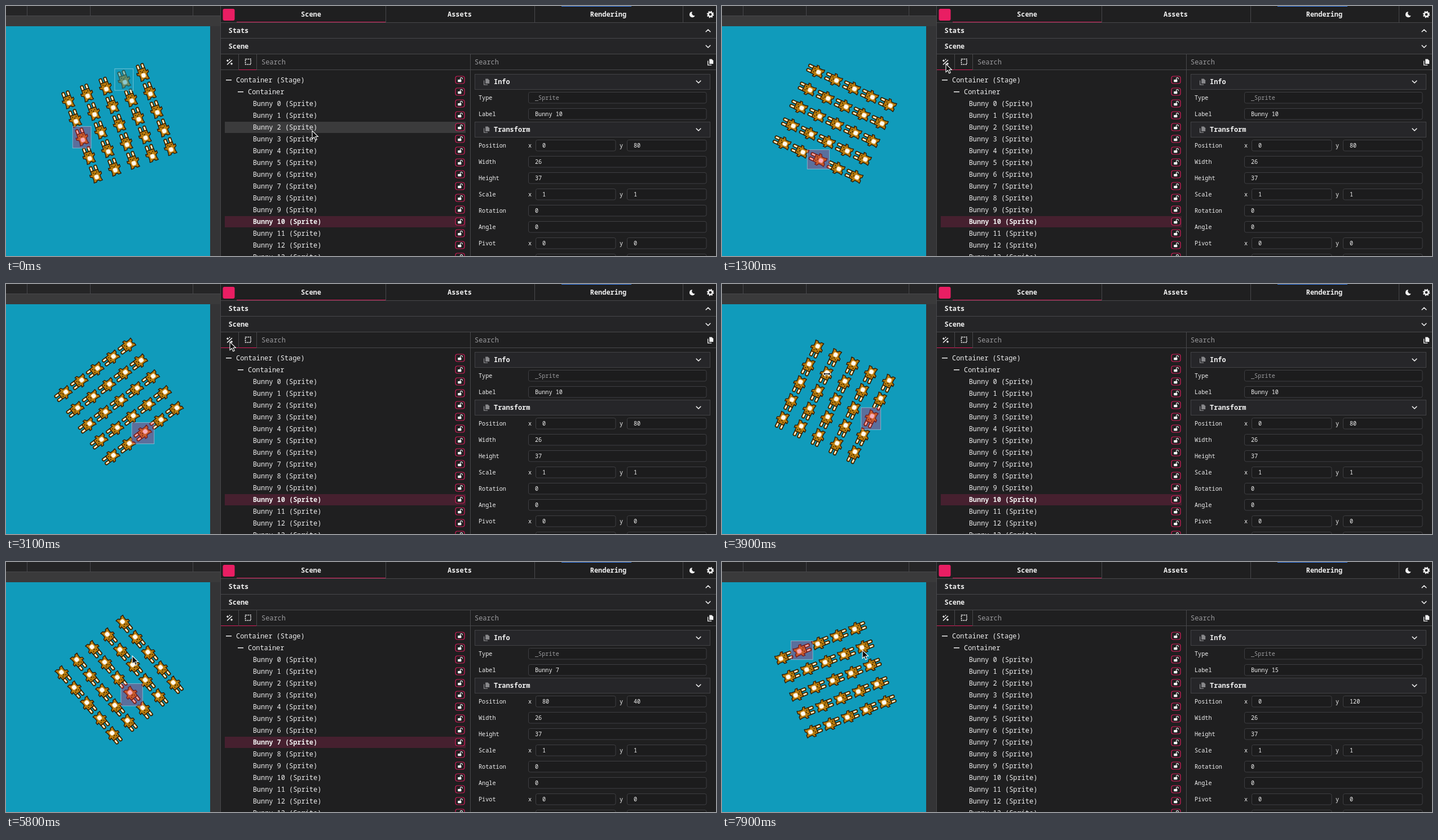
Write an HTML page that moves like this. It is 1259 px wide and 445 px high and loops after 8000 ms.

```html
<!DOCTYPE html>
<html lang="en">
<head>
<meta charset="utf-8">
<title>Scene inspector</title>
<style>
  html, body { margin: 0; width: 100%; height: 100%; overflow: hidden; background: #1f1f20; }
  svg { display: block; }
  text { font: 11.93px "Noto Sans Mono", "DejaVu Sans Mono", monospace; fill: #f1f1f1; white-space: pre; }
  .bold { font-weight: 700; }
  .semi { font-weight: 600; }
  .small { font-size: 10.2px; }
  .dim { fill: #9c9c9f; }
  .mid { text-anchor: middle; }
  .line { fill: none; stroke: #f1f1f1; stroke-width: 1.6; stroke-linecap: round; stroke-linejoin: round; }
  .edge { stroke: #48484b; fill: none; }
  .field { fill: #1c1c1d; stroke: #3f3f42; }
  .head { fill: #262629; stroke: #424245; }
</style>
</head>
<body>
<svg id="stage" width="1259" height="445" viewBox="0 0 1259 445">
  <defs>
    <g id="bunny" stroke="#2e1b04" stroke-width="1.6" stroke-linejoin="round">
      <path d="M-7.6-7V-17Q-5-19.6-2-17V-7Z M7.6-7V-17Q5-19.6 2-17V-7Z" fill="#b97c0e"/>
      <path d="M-4.8-9.5V-16M4.8-9.5V-16" stroke="#fff3dc" stroke-width="2.8"/>
      <path d="M-7.5-8H7.5L8.2-1 11.8-2.5 12 2 7.6 4.5 7.8 11 9 15.5H3.4L2 13H-2L-3.4 15.5H-9L-7.8 11-7.6 4.5-12 2-11.8-2.5-8.2-1Z" fill="#b97c0e"/>
      <path d="M-3.7-5V-2.8M3.7-5V-2.8M-1.5-1.2H1.5" fill="none"/>
      <rect x="-4.4" y="1.2" width="8.8" height="9" rx="3" fill="#fffaf0" stroke="#e2b566" stroke-width="1"/>
    </g>
    <g id="lock">
      <rect x="-8" y="-6.5" width="16" height="13" rx="3.5" fill="#1f1f20" stroke="#d81e5b" stroke-width="1.2"/>
      <rect x="-3.8" y="-.6" width="6.2" height="4.4" rx=".8" fill="#fff"/>
      <path d="M.6-.6V-2.2Q.6-4 2.4-4T4.2-2.2V-1.2" fill="none" stroke="#fff" stroke-width="1.1"/>
    </g>
    <g id="copy">
      <path d="M-1.8-5.5H2.5L5.2-2.8V3H-1.8Z" stroke="none"/>
      <path d="M-4.4-2.6V5.2H2.2" fill="none" stroke-width="1.3"/>
    </g>
    <path id="down" class="line" d="M-3.8-1.8L0 2 3.8-1.8"/>
    <path id="up" class="line" d="M-3.8 1.8L0-2 3.8 1.8"/>
  </defs>
  <g id="view"></g>
  <g id="boxes"></g>
  <g id="panel"></g>
  <g id="pointer">
    <path id="arrow" d="M0 0V14.6L3.4 11.5 5.7 16.7 8.2 15.6 5.9 10.5H10.4Z" fill="#0b0b0b" stroke="#fff" stroke-width="1.1"/>
    <path id="resize" d="M-7 0L-3-4V-1.3H3V-4L7 0 3 4V1.3H-3V4Z" fill="#0b0b0b" stroke="#fff" stroke-width="1.1"/>
  </g>
</svg>
<script>
const LOOP = 8000, STEP = 100;
const CENTER = { x: 200.6, y: 209.2 }, SCALE = 0.88, GAP = 40;
const START = -20.3, SPEED = -34.38; // degrees, degrees per second
const PINK = '#d81e5b';
const WAND_ON = 1100;

// time, x, y of the pointer tip
const MOVES = [
  [-200, 552, 246], [0, 543, 222], [400, 475, 172], [800, 404, 112], [1000, 397, 103],
  [3400, 397, 103], [3800, 186, 160], [4400, 186, 160], [4900, 208, 236], [5100, 208, 240],
  [5700, 224, 167], [5900, 224, 167], [6600, 190, 134], [6800, 186, 134], [7100, 174, 162], [7900, 249, 157]
];
const PICKS = [[0, 10], [4300, 18], [5000, 7], [6800, 15]];

const $ = id => document.getElementById(id);
const text = (x, y, str, cls = '', extra = '') =>
  `<text x="${x}" y="${y + (cls.includes('small') ? 3.6 : 4.2)}" class="${cls}" ${extra}>${str}</text>`;
const rect = (x, y, w, h, attrs) => `<rect x="${x}" y="${y}" width="${w}" height="${h}" ${attrs}/>`;
const fill = (x, y, w, h, color) => rect(x, y, w, h, `fill="${color}"`);
const use = (id, x, y, attrs = '') => `<use href="#${id}" x="${x}" y="${y}" ${attrs}/>`;
const edges = d => `<path class="edge" d="${d}"/>`;
const rowY = i => 131.5 + 21 * i;
const rowTop = i => rowY(i) - 9.5;
const cell = n => [n % 5, Math.floor(n / 5)];

function buildView() {
  let s = fill(0, 0, 381, 445, '#3a3a3b') + fill(0, 0, 380, 17, '#252526') +
    edges('M0 17.5H380M37.5 0V17M149.5 0V17M331.5 0V17') +
    fill(362, 36, 18, 409, '#343436') + fill(0, 36, 362, 409, '#109bbb');
  s += '<g id="grid">';
  for (let n = 0; n < 25; n++) {
    const [c, r] = cell(n);
    s += use('bunny', (c - 2) * GAP, (r - 2) * GAP);
  }
  $('view').innerHTML = s + '</g>';
}

function buildTop() {
  const gear = `<circle cx="1249" cy="15" r="3.6" fill="none" stroke="#f1f1f1" stroke-width="2.6"/>
    <circle cx="1249" cy="15" r="5.3" fill="none" stroke="#f1f1f1" stroke-width="2" stroke-dasharray="2.1 2.06"/>`;
  return fill(381, 0, 878, 445, '#1f1f20') + fill(381, 30, 878, 56, '#252527') +
    edges('M380.5 0V445M673.5 0V29M937.5 0V29M1200.5 0V29M381 29.5H1259M381 57.5H1259M381 85.5H1259M381 113.5H1259M823.5 86V445M412.5 86V113M444.5 86V113') +
    rect(384.5, 5, 21, 21, 'rx="3" fill="#e91e63"') +
    fill(409, 28, 264, 1, PINK) +
    text(541, 15, 'Scene', 'bold mid') + text(804.5, 15, 'Assets', 'semi mid') + text(1068, 15, 'Rendering', 'semi mid') +
    fill(985, 0, 124, 1, '#3b82f6') +
    '<path d="M1217 10.2A5 5 0 1 0 1221.6 17A4.4 4.4 0 0 1 1217 10.2Z" fill="#f1f1f1"/>' + gear +
    text(394.5, 44, 'Stats', 'bold') + text(394.5, 72, 'Scene', 'bold') +
    use('up', 1245, 44) + use('down', 1245, 72);
}

function buildTree() {
  let s = fill(413, 113, 31, 1, PINK) + rect(381, 113, 31, 1, `id="wand" fill="${PINK}"`) +
    '<path class="line" d="M392.5 104L400.5 96.5M393 96V98.6M391.7 97.3H394.3M400 101.5V104.1M398.7 102.8H401.3M396.5 94.8V95.6"/>' +
    rect(424.5, 94.5, 9.5, 9.5, 'fill="none" stroke="#f1f1f1" stroke-width="1.5" stroke-dasharray="2.6 1.2"') +
    text(453, 100, 'Search', 'dim');
  s += rect(388, 0, 427, 20, 'id="hover" fill="#3b3b3c"') + rect(388, 0, 427, 20, 'id="chosen" fill="#46202f"');
  s += text(408, rowY(0), 'Container (Stage)') + text(429, rowY(1), 'Container');
  s += fill(390, 131, 10, 1.5, '#f1f1f1') + fill(411, 152, 10, 1.5, '#f1f1f1');
  for (let i = 0; i < 16; i++) {
    if (i > 1) s += text(437.7, rowY(i), `Bunny ${i - 2} (Sprite)`, '', `id="row${i - 2}"`);
    s += use('lock', 805, rowY(i));
  }
  return s;
}

function buildProps() {
  const gray = 'fill="#88888b" stroke="#88888b"', white = 'fill="#f1f1f1" stroke="#f1f1f1"';
  const header = (y, name) => rect(831.5, y - 13.5, 417, 27, 'class="head"') +
    use('copy', 852, y, gray) + text(865, y, name, 'bold') + use('down', 1228, y);
  const field = (x, y, w, value, id = '', cls = '') => rect(x + .5, y - 9.5, w, 19.5, 'rx="3" class="field"') +
    text(x + 12, y + .5, value, 'small ' + cls, id && `id="${id}"`);
  const label = (y, name) => text(838, y, name, 'small');
  const one = (y, name, value, id, cls) => label(y, name) + field(926, y, 315.5, value, id, cls);
  const two = (y, name, a, b, ids = ['', '']) => label(y, name) +
    text(926, y, 'x', 'small') + field(939, y, 141.5, a, ids[0]) +
    text(1088, y, 'y', 'small') + field(1101, y, 140.5, b, ids[1]);
  return text(831, 100, 'Search', 'dim') + use('copy', 1249, 100, white) +
    header(135, 'Info') + one(163, 'Type', '_Sprite', '', 'dim') + one(192, 'Label', '', 'name') +
    header(220, 'Transform') + two(248, 'Position', '', '', ['posX', 'posY']) +
    one(277, 'Width', 26) + one(306, 'Height', 37) + two(335, 'Scale', 1, 1) +
    one(364, 'Rotation', 0) + one(393, 'Angle', 0) + two(422, 'Pivot', 0, 0) + two(451, '', '', '');
}

function pointerAt(t) {
  let i = 1;
  while (i < MOVES.length - 1 && MOVES[i][0] < t) i++;
  const [t0, x0, y0] = MOVES[i - 1], [t1, x1, y1] = MOVES[i];
  const u = Math.min(1, Math.max(0, (t - t0) / (t1 - t0)));
  return [x0 + (x1 - x0) * u, y0 + (y1 - y0) * u];
}

// tree row under the pointer, or -1
function rowAt(t) {
  const [x, y] = pointerAt(t);
  return x > 388 && x < 815 && y > 121 ? Math.floor((y - 121) / 21) : -1;
}

// upright box around a rotated rectangle with centre (lx, ly) in the grid
function bounds(lx, ly, w, h, angle, style) {
  const c = Math.cos(angle), s = Math.sin(angle);
  const bw = SCALE * (w * Math.abs(c) + h * Math.abs(s)), bh = SCALE * (h * Math.abs(c) + w * Math.abs(s));
  const x = CENTER.x + SCALE * (lx * c - ly * s), y = CENTER.y + SCALE * (lx * s + ly * c);
  return rect(x - bw / 2, y - bh / 2, bw, bh, style);
}

function spriteBounds(n, angle, style) {
  const [c, r] = cell(n);
  return bounds((c - 2) * GAP, (r - 2) * GAP, 26, 37, angle, style);
}

const PICKED = 'fill="#e91e63" fill-opacity=".35" stroke="#fff" stroke-opacity=".4"';
const HOVERED = 'fill="#189ab8" fill-opacity=".5" stroke="#fff" stroke-opacity=".4"';
let shown = -1;

function select(n) {
  if (n === shown) return;
  if (shown >= 0 && $('row' + shown)) $('row' + shown).removeAttribute('class');
  shown = n;
  const row = $('row' + n), [c, r] = cell(n);
  if (row) row.setAttribute('class', 'bold');
  $('chosen').setAttribute('y', rowTop(n + 2));
  $('name').textContent = 'Bunny ' + n;
  $('posX').textContent = c * GAP;
  $('posY').textContent = r * GAP;
}

function draw(t) {
  const deg = START + SPEED * t / 1000, angle = deg * Math.PI / 180;
  $('grid').setAttribute('transform', `translate(${CENTER.x} ${CENTER.y}) rotate(${deg}) scale(${SCALE})`);

  const pick = PICKS.filter(p => p[0] <= t).pop()[1];
  select(pick);

  const row = rowAt(t), late = rowAt(t - STEP);
  $('hover').setAttribute('visibility', row < 0 ? 'hidden' : 'visible');
  $('hover').setAttribute('y', rowTop(row));
  let boxes = spriteBounds(pick, angle, PICKED);
  if (late > 1) boxes += spriteBounds(late - 2, angle, HOVERED);
  else if (late >= 0) boxes += bounds(0, 0, 186, 197, angle, HOVERED);
  $('boxes').innerHTML = boxes;

  $('wand').setAttribute('visibility', t >= WAND_ON ? 'visible' : 'hidden');

  const [x, y] = pointerAt(t), sizing = t >= 3700 && t <= 4000;
  $('pointer').setAttribute('transform', `translate(${x} ${y})`);
  $('arrow').setAttribute('visibility', sizing ? 'hidden' : 'visible');
  $('resize').setAttribute('visibility', sizing ? 'visible' : 'hidden');
}

buildView();
$('panel').innerHTML = buildTop() + buildTree() + buildProps();

const begin = performance.now();
function tick() {
  const t = (performance.now() - begin) % LOOP;
  draw(Math.floor(t / STEP) * STEP);
  requestAnimationFrame(tick);
}
tick();
</script>
</body>
</html>
```
